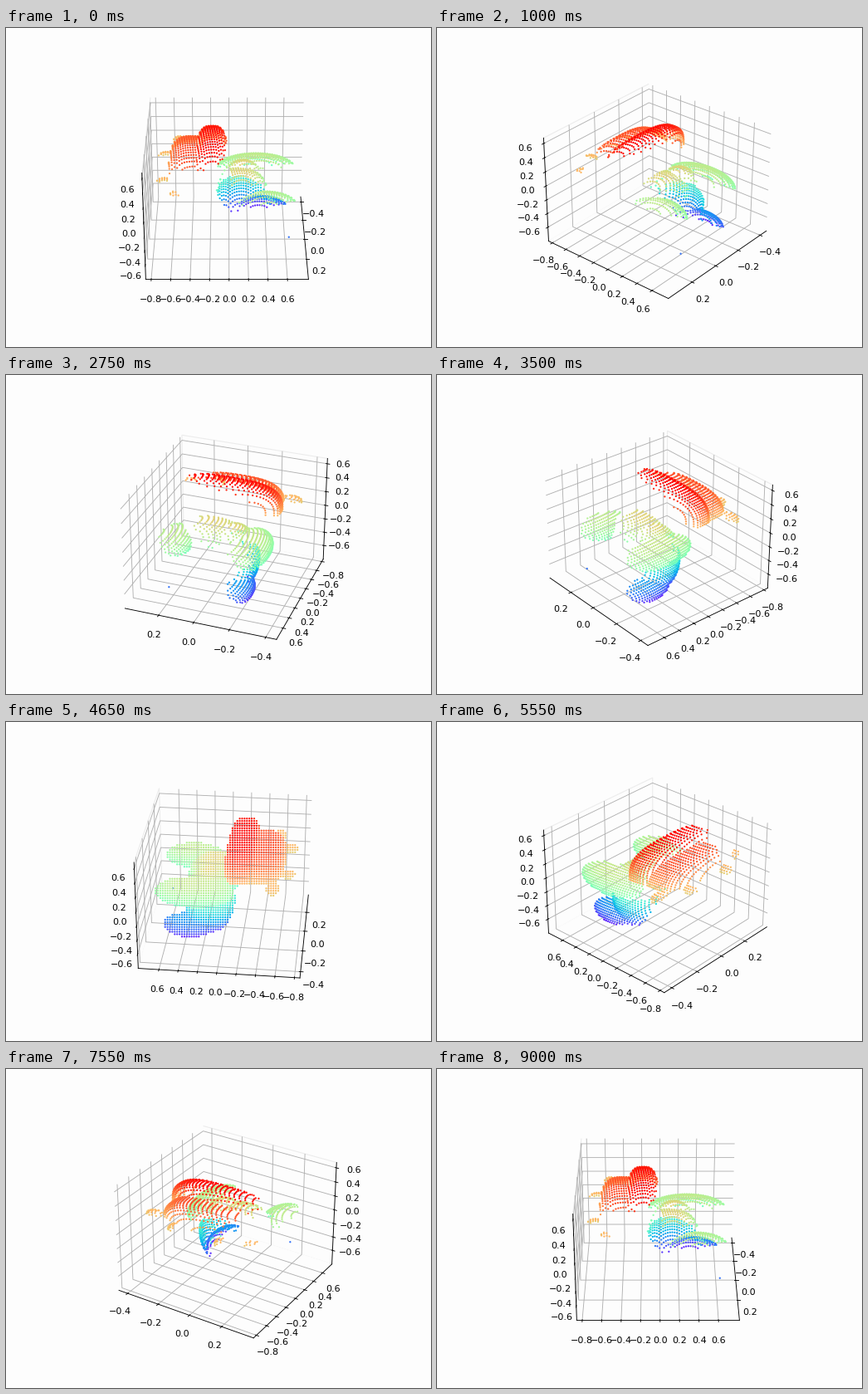
A matplotlib script for the animation above (9.05 s loop, 512 px wide and 384 px high).

```python
import numpy as np
import matplotlib.pyplot as plt
from matplotlib.animation import FuncAnimation

BG = "#fdfdfd"
STEP_DEG = 2
FRAMES = 181
ELEV = 30
SCAN_AZIM = 186               # side the solid was scanned from
FOCAL = 1598.3                # pixels per unit at distance 1
DIST = 10
PITCH = 2.9                   # scan spacing in pixels
TOP = 0.39                    # half height of the cloud in box units

LIMITS = np.array([(-0.458, 0.394), (-0.856, 0.816), (-0.808, 0.675)])
BOX = np.array([1.1906, 1.1906, 0.8929])


def blob(center, radii, power=2, floor=-1):
    """Rounded solid, optionally cut flat below a floor height."""
    def inside(p):
        q = np.abs((p - center) / radii) ** power
        return (q.sum(-1) < 1) & (p[..., 2] > floor)
    return inside


def build():
    parts = [
        # domed head: high ridge and lower shoulder
        blob((0.03, -0.115, 0.20), (0.42, 0.12, 0.19), 3, 0.18),
        blob((0.02, -0.27, 0.12), (0.37, 0.17, 0.20), 3, 0.17),
        # trunk, column and foot
        blob((0.08, 0.10, 0.00), (0.26, 0.20, 0.15)),
        blob((-0.10, 0.12, -0.12), (0.19, 0.19, 0.27)),
        blob((-0.18, 0.27, -0.305), (0.12, 0.20, 0.085)),
        # two arms
        blob((0.32, 0.28, 0.02), (0.15, 0.23, 0.08)),
        blob((-0.24, 0.22, 0.02), (0.17, 0.30, 0.09)),
    ]
    for side in (-1, 1):      # tips around the rim of the head
        parts.append(blob((0.04 + 0.20 * side, -0.46, 0.165), (0.05, 0.06, 0.03)))
        parts.append(blob((0.03 + 0.42 * side, -0.37, 0.165), (0.08, 0.05, 0.03)))
    return lambda p: np.any([part(p) for part in parts], axis=0)


def scan(solid):
    """First hit of every ray of a regular grid seen from the scan side."""
    el, az = np.radians([ELEV, SCAN_AZIM])
    back = np.array([np.cos(el) * np.cos(az), np.cos(el) * np.sin(az), np.sin(el)])
    right = np.array([-np.sin(az), np.cos(az), 0])
    up = np.cross(back, right)
    gx, gy = np.meshgrid(np.arange(-95, 96, PITCH), np.arange(-80, 86, PITCH))
    rays = (gx.reshape(-1, 1) * right + gy.reshape(-1, 1) * up) / FOCAL - back

    def at(depth, ray):
        return DIST * back + depth[:, None] * ray

    step = 0.01
    hit = np.full(len(rays), np.nan)
    for d in np.arange(DIST - 0.8, DIST + 0.8, step):
        todo = np.flatnonzero(np.isnan(hit))
        found = solid(at(np.full(len(todo), d), rays[todo]))
        hit[todo[found]] = d

    rays, far = rays[~np.isnan(hit)], hit[~np.isnan(hit)]
    near = far - step
    for _ in range(6):
        mid = (near + far) / 2
        found = solid(at(mid, rays))
        far = np.where(found, mid, far)
        near = np.where(found, near, mid)
    return at(far, rays)


stray = [(0.292, 0.46, -0.2725)]
cloud = np.vstack([scan(build()), stray])
data = cloud * np.ptp(LIMITS, axis=1) / BOX + LIMITS.mean(axis=1)

fig = plt.figure(figsize=(6.4, 4.8), dpi=80, facecolor=BG)
ax = fig.add_subplot(projection="3d")
ax.patch.set_visible(False)
ax.scatter(*data.T, c=cloud[:, 2], cmap="rainbow", vmin=-TOP, vmax=TOP,
           s=4.2, linewidths=0, depthshade=False)

for axis, (lo, hi) in zip((ax.xaxis, ax.yaxis, ax.zaxis), LIMITS):
    pad = (hi - lo) / 50      # no ticks in the outer margin
    first, last = np.ceil((lo + pad) / 0.2), np.floor((hi - pad) / 0.2)
    axis.set_ticks(np.arange(first, last + 1) / 5)
    axis.set_pane_color(BG)
ax.yaxis.pane.set_edgecolor("#ececec")
ax.set(xlim=LIMITS[0], ylim=LIMITS[1], zlim=LIMITS[2])


def update(i):
    # the tiny offset settles which walls show at right angles
    ax.view_init(elev=ELEV, azim=(i * STEP_DEG) % 360 + 0.001)
    return []


anim = FuncAnimation(fig, update, frames=FRAMES, interval=50,
                     init_func=lambda: update(0), repeat=True, repeat_delay=0)
plt.show()
```
